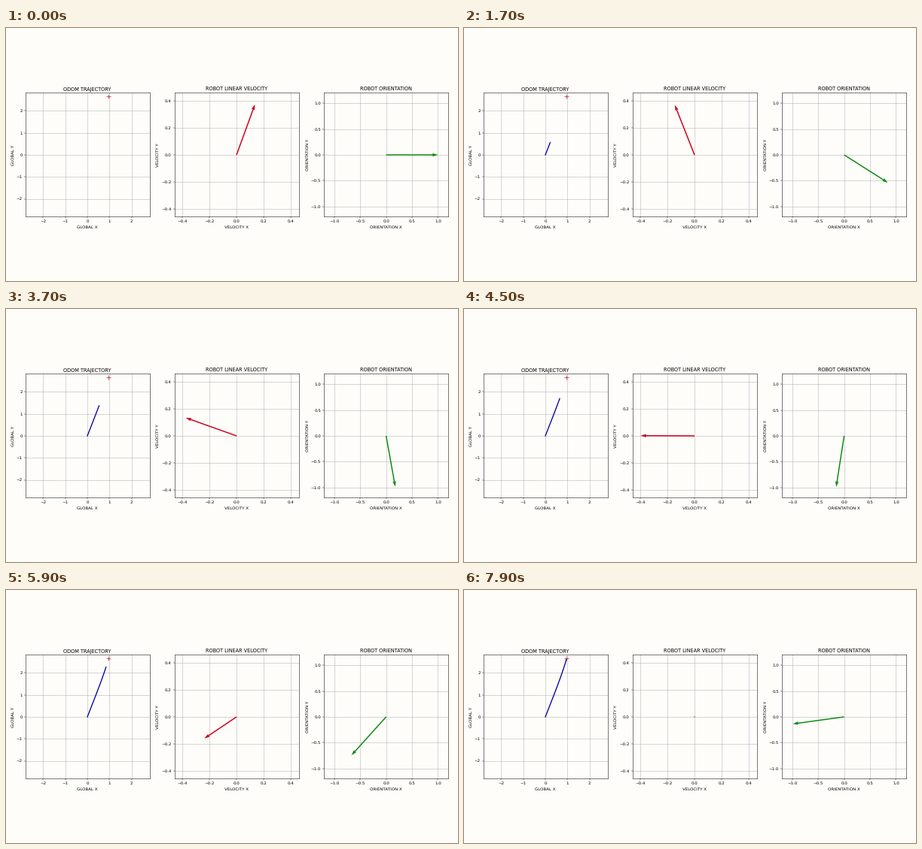
A matplotlib script for the animation above (8000 ms loop, 600 px wide and 337 px high).

```python
import numpy as np
import matplotlib.pyplot as plt
from matplotlib.animation import FuncAnimation

WIDTH, HEIGHT, DPI = 600, 337, 39.3
FRAMES, INTERVAL = 80, 100
PAPER = "#fffdfa"
SIDE, MIDDLE = 165, 168        # panel size and centre height in pixels
GOAL_X, GOAL_Y = 0.963, 2.65
GOAL = np.hypot(GOAL_X, GOAL_Y)
CRUISE, GAIN = 0.433, 1.1      # travel per second, braking gain
TOP_SPEED, TOLERANCE = 0.396, 0.05
LAG = 0.33                     # seconds the robot trails its commands

plt.rcParams.update({
    "font.family": "DejaVu Sans",
    "text.hinting": "none",
    "figure.facecolor": PAPER,
    "axes.facecolor": PAPER,
    "axes.linewidth": 0.95,
    "grid.linewidth": 0.95,
})


def approach(t, goal, rate, gain):
    """Move at a constant rate, then settle on the goal proportionally."""
    brake = rate / gain
    knee = (goal - brake) / rate
    return rate * t if t < knee else goal - brake * np.exp(-gain * (t - knee))


def lagged(t):
    return t - LAG * (1 - np.exp(-t / LAG))


def speed(t):
    remaining = GOAL - approach(t, GOAL, CRUISE, GAIN)
    return TOP_SPEED * min(1, remaining * GAIN / CRUISE) if remaining > TOLERANCE else 0


def course(t):
    return 70 + 24.4 * t


def heading(t):
    return -approach(lagged(t), 180, 23.7, 1.15)


def path(t):
    end = GOAL_Y * approach(lagged(t), GOAL, CRUISE, GAIN) / GOAL
    y = np.linspace(0, end, 60)
    return 0.39 * y - 0.00143 * y ** 4, y


fig = plt.figure(figsize=(WIDTH / DPI, (HEIGHT + 1e-6) / DPI), dpi=DPI)


def panel(center, title, label, limit, step):
    ax = fig.add_axes([(center - SIDE / 2) / WIDTH, (MIDDLE - SIDE / 2) / HEIGHT,
                       SIDE / WIDTH, SIDE / HEIGHT])
    ticks = step * np.arange(-2, 3)
    ax.set(title=title, xlim=(-limit, limit), ylim=(-limit, limit),
           xticks=ticks, yticks=ticks)
    ax.set_xlabel(label + " X", labelpad=5)
    ax.set_ylabel(label + " Y", labelpad=3.5)
    ax.grid(True)
    return ax


def arrow(ax, color):
    return ax.quiver([0], [0], [1], [0], color=color, width=0.009, angles="xy",
                     scale_units="xy", scale=1, zorder=3)


def point(quiver, length, degrees):
    a = np.radians(degrees)
    quiver.set_UVC([length * np.cos(a)], [length * np.sin(a)])


odom = panel(108, "ODOM TRAJECTORY", "GLOBAL", 2.82, 1)
linear = panel(306, "ROBOT LINEAR VELOCITY", "VELOCITY", 0.457, 0.2)
orient = panel(504.6, "ROBOT ORIENTATION", "ORIENTATION", 1.2, 0.5)

odom.plot(GOAL_X, GOAL_Y, "+", color="#c02448", ms=10, mew=1.4, zorder=2)
trail, = odom.plot([], [], color="#0000a0", lw=2.4, zorder=3)
velocity = arrow(linear, "#cc0019")
facing = arrow(orient, "#0a8a10")


def update(frame):
    t = frame * INTERVAL / 1000
    trail.set_data(*path(t))
    trail.set_visible(frame > 0)
    point(velocity, speed(t), course(t))
    point(facing, 1, heading(t))
    return trail, velocity, facing


anim = FuncAnimation(fig, update, frames=FRAMES, interval=INTERVAL,
                     repeat=True, repeat_delay=0, blit=False)
plt.show()
```
